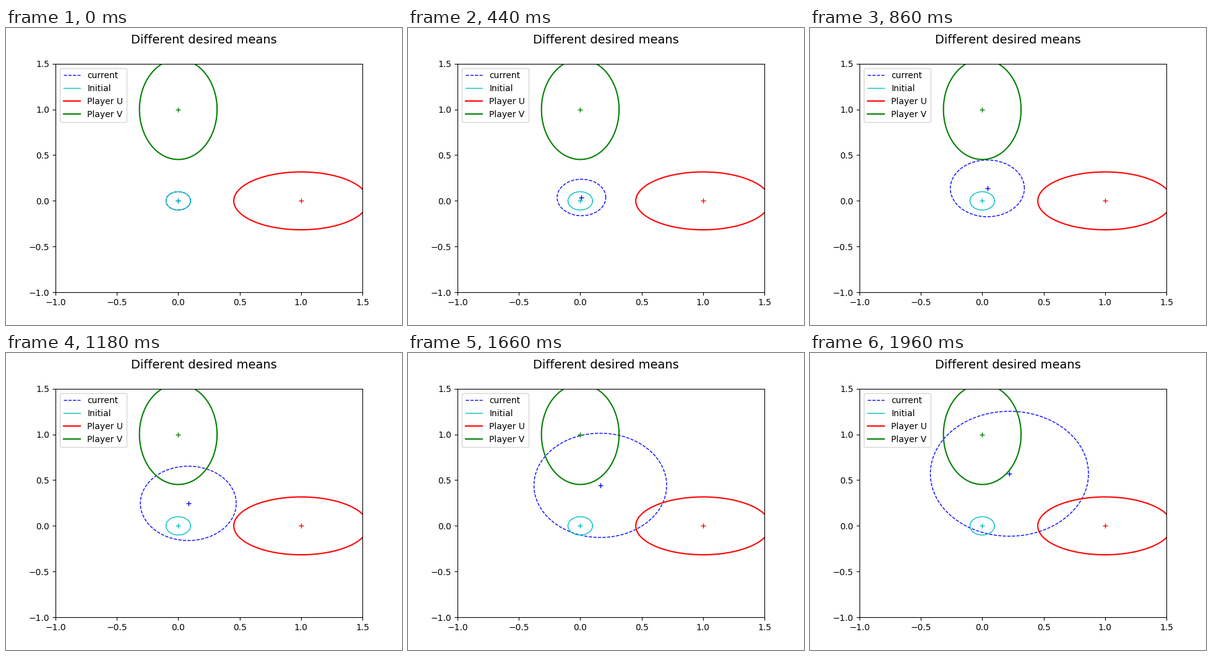
Write a matplotlib script that moves like this. It is 640x480 px and loops after 1980 ms.

```python
import numpy as np
import matplotlib.pyplot as plt
from matplotlib.animation import FuncAnimation

FRAMES, STEP_MS = 99, 20
THETA = np.linspace(0, 2 * np.pi, 100)

# Sampled means and standard deviations of the evolving distribution.
T = np.array([0.22, 0.43, 0.59, 0.75, 0.83, 0.98])
MEAN_X = np.array([0.0098, 0.0410, 0.0820, 0.1347, 0.1643, 0.2198])
MEAN_Y = np.array([0.0370, 0.1377, 0.2449, 0.3736, 0.4420, 0.5715])
STD_X = np.array([0.198, 0.302, 0.391, 0.488, 0.539, 0.645])
STD_Y = np.array([0.199, 0.311, 0.407, 0.513, 0.568, 0.684])
VAR0 = 0.01

# Means start at rest (t^2 leading term); variances grow from VAR0.
mean_fits = [np.polyfit(T, m / T**2, 2) for m in (MEAN_X, MEAN_Y)]
var_fits = [np.polyfit(T, (s**2 - VAR0) / T, 2) for s in (STD_X, STD_Y)]


def state(t):
    mean = [t**2 * np.polyval(c, t) for c in mean_fits]
    var = [VAR0 + t * np.polyval(c, t) for c in var_fits]
    return mean, var


def ellipse(mean, var):
    rx, ry = np.sqrt(var)
    return mean[0] + rx * np.cos(THETA), mean[1] + ry * np.sin(THETA)


def add_gaussian(ax, mean, var, color, label, lw=1.5, ls="-"):
    curve, = ax.plot(*ellipse(mean, var), color=color, ls=ls, lw=lw, label=label)
    centre, = ax.plot([mean[0]], [mean[1]], "+", color=color)
    return curve, centre


fig, ax = plt.subplots(figsize=(6.4, 4.8), dpi=100)
fig.suptitle("Different desired means", fontsize=14)

curve, centre = add_gaussian(ax, *state(0), "b", "current", 1, "--")
add_gaussian(ax, (0, 0), (VAR0, VAR0), "c", "Initial", 1)
add_gaussian(ax, (1, 0), (0.3, 0.1), "r", "Player U")
add_gaussian(ax, (0, 1), (0.1, 0.3), "g", "Player V")

ax.set(xlim=(-1, 1.5), ylim=(-1, 1.5))
ax.set_xticks(np.arange(-1, 1.6, 0.5))
ax.set_yticks(np.arange(-1, 1.6, 0.5))
ax.legend(loc="upper left")


def update(i):
    mean, var = state(i / 100)
    curve.set_data(*ellipse(mean, var))
    centre.set_data([mean[0]], [mean[1]])
    return curve, centre


anim = FuncAnimation(fig, update, frames=FRAMES, interval=STEP_MS,
                     repeat=True, repeat_delay=0)
plt.show()
```
